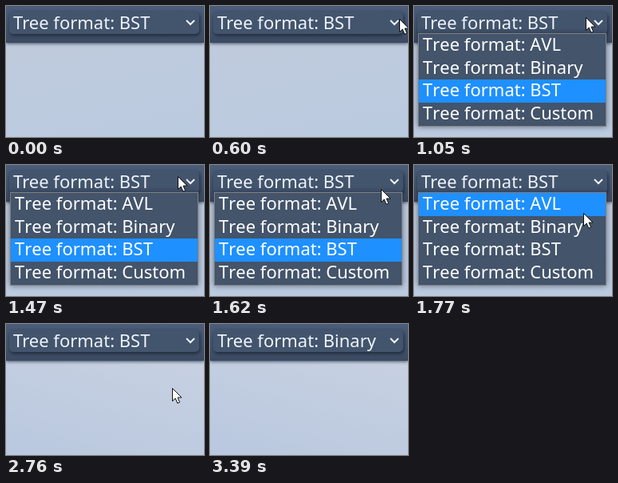
Recreate the animation shown at these times as an HTML page. Size 248 by 164 pixels, loop 4020 ms.

```html
<!DOCTYPE html>
<html lang="en">
<head>
<meta charset="utf-8">
<title>Tree format</title>
<style>
  html, body { margin: 0; width: 100%; height: 100%; overflow: hidden; }
  #stage {
    position: relative; width: 248px; height: 164px; overflow: hidden;
    background: linear-gradient(170deg, #bfcbdd 25%, #bacadf);
    color: #fff; font: 22px "Noto Sans", "Open Sans", sans-serif; white-space: pre;
  }
  #stage.light { background: linear-gradient(195deg, #c6d0e1 25%, #b9c8df); }
  #stage > * { position: absolute; box-sizing: border-box; }
  header {
    left: 0; top: 0; width: 248px; height: 46px;
    background: linear-gradient(#4a5d7a, #43546d 60%, #3b4a61);
    box-shadow: 0 1px 4px rgba(20, 30, 50, .75);
  }
  #select {
    left: 4px; top: 7px; width: 238px; height: 28px; padding-left: 5px;
    color: #eef3fa; line-height: 27px; border-radius: 5px; background: #43546d;
    box-shadow: 1px 2px 4px rgba(15, 22, 36, .7);
  }
  #menu {
    left: 5px; top: 34px; width: 236px; height: 117px; font-kerning: none;
    border: 1px solid #808080; background: #43546b;
    box-shadow: 0 0 7px rgba(20, 30, 50, .55);
  }
  #menu div { height: 28.5px; padding-left: 5px; line-height: 24px; }
  #menu .on { background: #1e90ff; }
  #menu.opening { border-color: transparent; background: none; box-shadow: 0 1px 4px rgba(20, 30, 50, .5); }
  #menu.opening div { visibility: hidden; }
  svg { left: 0; top: 0; }
</style>
</head>
<body>
<div id="stage">
  <header></header>
  <div id="select"></div>
  <div id="menu"></div>
  <svg width="248" height="164">
    <path d="M226 18l5 5 5-5" fill="none" stroke="#eef3fa" stroke-width="2"/>
    <path id="cursor" d="M.5 .5V16.5L4.2 13 6.8 19.2 9.6 18 7 12H12Z" fill="#fff" stroke="#111"/>
  </svg>
</div>
<script>
const LOOP = 4020, STEP = 30;
const formats = ["AVL", "Binary", "BST", "Custom"];
const [stage, select, menu, cursor] =
  ["stage", "select", "menu", "cursor"].map(id => document.getElementById(id));
const label = name => "Tree format: " + name;

const rows = formats.map(name => {
  const row = document.createElement("div");
  row.textContent = label(name);
  return menu.appendChild(row);
});

const easeIn = p => 1 - Math.cos(p * Math.PI / 2);
const easeOut = p => Math.sin(p * Math.PI / 2);

// Cursor moves: start, end, from, to, easing
const moves = [
  [540, 780, [250, 18], [215, 14], easeOut],
  [1440, 1770, [215, 14], [212, 60], easeIn],
  [1770, 1950, [212, 60], [208, 80], easeOut],
  [3210, 3390, [208, 80], [250, 63], easeIn]
];

function cursorAt(t) {
  const [start, end, from, to, ease] = moves.findLast(m => t >= m[0]) || moves[0];
  const p = ease(Math.min(1, Math.max(0, (t - start) / (end - start))));
  return from.map((v, i) => v + (to[i] - v) * p);
}

function draw(now) {
  const t = Math.floor(now % LOOP / STEP) * STEP;
  const [x, y] = cursorAt(t);
  const hovered = y < 35 ? 2 : y < 63.5 ? 0 : 1;

  cursor.setAttribute("transform", `translate(${Math.round(x)} ${Math.round(y)})`);
  select.textContent = label(t < 2790 ? "BST" : "Binary");
  stage.classList.toggle("light", t >= 2760);
  menu.hidden = t < 960 || t >= 2760;
  menu.classList.toggle("opening", t < 1050);
  rows.forEach((row, i) => row.classList.toggle("on", i === hovered));
}

const begin = performance.now();
function tick() {
  draw(performance.now() - begin);
  requestAnimationFrame(tick);
}
tick();
</script>
</body>
</html>
```
